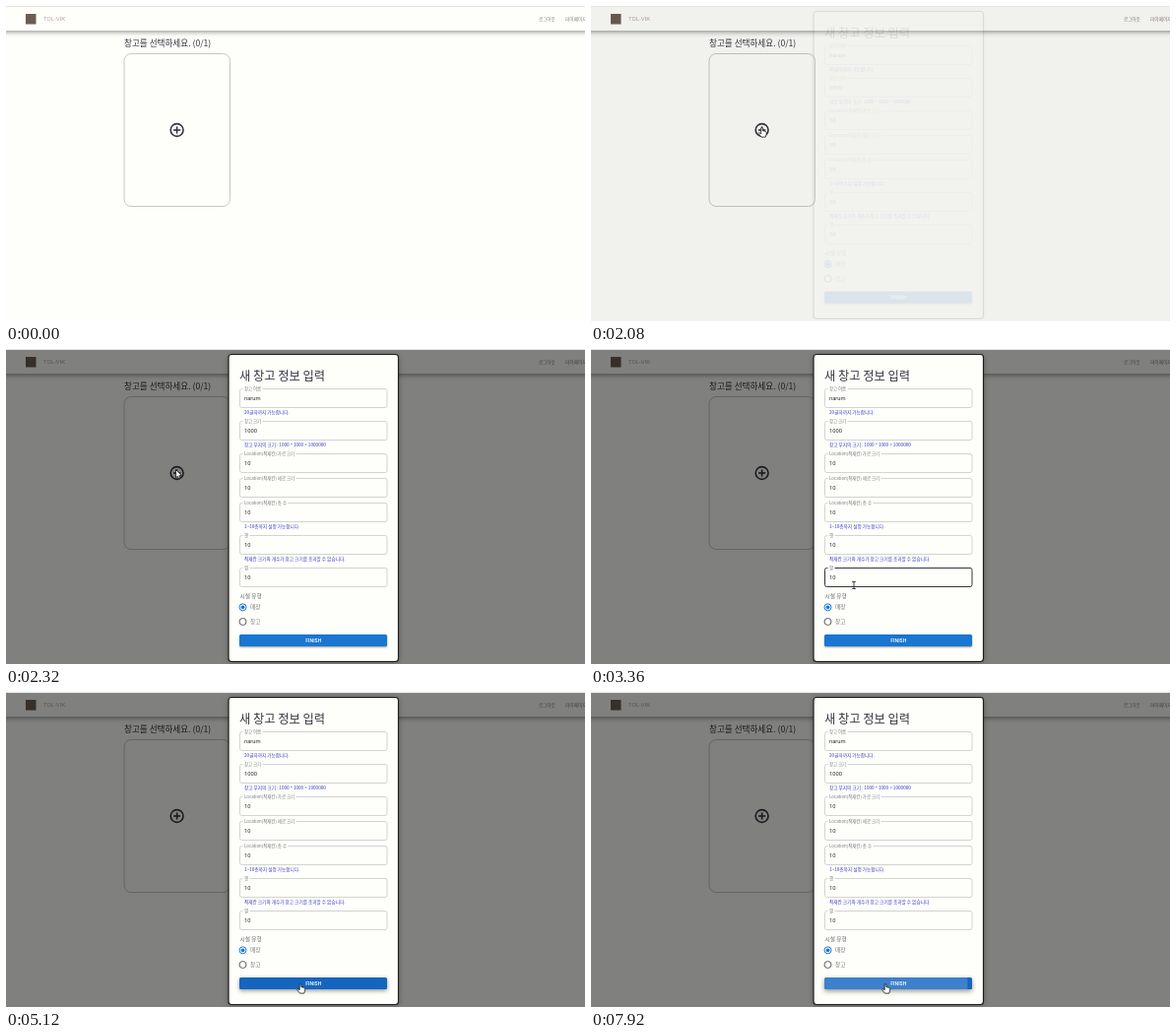
An HTML page with a canvas for the animation above (8000 ms loop, 588 by 320 pixels).

```html
<!DOCTYPE html>
<html lang="ko">
<head>
<meta charset="utf-8">
<style>
html, body { margin: 0; width: 100%; height: 100%; overflow: hidden; background: #fefefb; }
canvas { display: block; width: 588px; height: 320px; }
</style>
</head>
<body>
<canvas id="stage" width="588" height="320"></canvas>
<script>
const W = 588, H = 320, LOOP = 8000;
const PAPER = '#fefefb', BLUE = '#1976d2', INK = '#34343f';
const KR = '"Noto Sans CJK KR", "Noto Sans CJK JP", "Noto Sans", sans-serif';
const LATIN = 'Roboto, "Noto Sans CJK KR", sans-serif';

const main = document.getElementById('stage').getContext('2d');
const layer = document.createElement('canvas');
layer.width = W;
layer.height = H;
const modal = layer.getContext('2d');

// top, label, value, helper line
const fields = [
  [40.5, '창고 이름', 'narum', '20글자까지 가능합니다.'],
  [73.5, '창고 크기', '1000', '창고 부지의 크기 : 1000 * 1000 = 1000000'],
  [106.5, 'Location(적재칸) 가로 크기', '10'],
  [131.5, 'Location(적재칸) 세로 크기', '10'],
  [156.5, 'Location(적재칸) 층 수', '10', '1~10층까지 설정 가능합니다.'],
  [189.5, '행', '10', '적재칸 크기와 개수가 창고 크기를 초과할 수 없습니다.'],
  [222.5, '열', '10']
];

// pointer stops: step, x, y
const path = [
  [2, 190, 115], [3, 202, 88], [4, 215, 52], [5, 226, 20], [6, 231, 1],
  [7, 231, 1], [8, 225, 14], [9, 212, 46], [10, 196, 86], [11, 189, 105],
  [12, 180, 119], [14, 173.5, 123.5], [21, 173.5, 123.5], [22, 172.5, 122.5],
  [23, 172.5, 122.5], [26, 240, 162], [30, 263, 214], [34, 267, 240],
  [38, 287, 283], [40, 296, 294], [42, 299.5, 297], [43, 299, 296.5], [80, 299, 296.5]
];

const clamp = v => Math.max(0, Math.min(1, v));
const inside = (p, x, y, w, h) => p.x >= x && p.x <= x + w && p.y >= y && p.y <= y + h;

// cubic-bezier(.4, 0, .2, 1)
function ease(x) {
  x = clamp(x);
  let lo = 0, hi = 1;
  for (let i = 0; i < 24; i++) {
    const u = (lo + hi) / 2, v = 1 - u;
    if (1.2 * v * v * u + 0.6 * v * u * u + u * u * u < x) lo = u; else hi = u;
  }
  return lo * lo * (3 - 2 * lo);
}

function pointerAt(step) {
  if (step < path[0][0]) return null;
  let i = 1;
  while (i < path.length - 1 && path[i][0] < step) i++;
  const [n0, x0, y0] = path[i - 1], [n1, x1, y1] = path[i];
  const k = clamp((step - n0) / (n1 - n0));
  return { x: x0 + (x1 - x0) * k, y: y0 + (y1 - y0) * k };
}

function text(g, s, x, y, size, color, font = KR, weight = 400) {
  g.font = `${weight} ${size}px ${font}`;
  g.fillStyle = color;
  g.fillText(s, x, y);
}

function box(g, x, y, w, h, r, fill, stroke, line = 1) {
  g.beginPath();
  g.roundRect(x, y, w, h, r);
  if (fill) { g.fillStyle = fill; g.fill(); }
  if (stroke) { g.strokeStyle = stroke; g.lineWidth = line; g.stroke(); }
}

function circle(g, x, y, r, fill, stroke, line = 1) {
  g.beginPath();
  g.arc(x, y, r, 0, Math.PI * 2);
  if (fill) { g.fillStyle = fill; g.fill(); }
  if (stroke) { g.strokeStyle = stroke; g.lineWidth = line; g.stroke(); }
}

function shadow(g, color, blur, dy) {
  g.shadowColor = color;
  g.shadowBlur = blur;
  g.shadowOffsetY = dy;
}

function drawPage(g) {
  g.fillStyle = PAPER;
  g.fillRect(0, 0, W, H);

  g.save();
  shadow(g, 'rgba(0,0,0,.42)', 5, 1.5);
  g.fillStyle = PAPER;
  g.fillRect(-10, 0, W + 20, 25);
  g.restore();

  g.fillStyle = '#6b5d54';
  g.fillRect(20, 8, 10.5, 10.5);
  text(g, 'TOL-VIK', 38, 15.3, 6.2, '#94807a', LATIN, 300);
  text(g, '로그아웃', 541, 14.8, 4.5, '#8b807c');
  text(g, '마이페이지', 568, 14.8, 4.7, '#8b807c');

  text(g, '창고를 선택하세요. (0/1)', 120, 41.2, 8.6, INK);
  box(g, 120, 48.5, 107.5, 155, 7, null, '#c3cbc5');
  circle(g, 173.6, 126, 6.4, null, INK, 1.6);
  g.fillStyle = INK;
  g.fillRect(170, 125.2, 7.2, 1.6);
  g.fillRect(172.8, 122.4, 1.6, 7.2);
}

function drawField(g, [y, label, value, help], hot) {
  box(g, 237.5, y, 149.5, 19, 2, null, hot ? '#33363a' : '#cdd0cd', hot ? 1 : 0.9);
  g.font = `400 4.4px ${KR}`;
  g.fillStyle = PAPER;
  g.fillRect(240.5, y - 1, g.measureText(label).width + 3, 2);
  text(g, label, 242, y + 1.4, 4.4, '#777a7a');
  text(g, value, 242, y + 11.6, 5.8, '#2c2c30', LATIN);
  if (help) text(g, help, 242, y + 25.2, 4.65, '#3c3cc8');
}

function drawButton(g, step) {
  const hover = ease((step - 38.6) / 2.5);
  const press = clamp((step - 75.15) / 2.8);
  const mix = (a, b) => Math.round(a + (b - a) * hover);

  g.save();
  shadow(g, 'rgba(0,0,0,.42)', 2 + hover * 2 + press, 1 + hover * 0.5 + press * 0.5);
  box(g, 237, 290, 150, 12, 1.5, `rgb(${mix(25, 21)},${mix(118, 101)},${mix(210, 192)})`);
  g.restore();

  const grow = ease((step - 75.15) / 5.5);
  if (grow > 0) {
    g.save();
    g.beginPath();
    g.roundRect(237, 290, 150, 12, 1.5);
    g.clip();
    circle(g, 299, 297, 89 * grow, `rgba(255,255,255,${0.1 + 0.08 * grow})`);
    g.restore();
  }
  g.textAlign = 'center';
  text(g, 'FINISH', 312.3, 298, 5.1, '#fff', LATIN, 500);
  g.textAlign = 'left';
}

function drawModal(g, step, p) {
  g.clearRect(0, 0, W, H);
  g.save();
  shadow(g, 'rgba(0,0,0,.3)', 6, 1);
  box(g, 226, 5.5, 172.5, 312, 3, PAPER);
  g.restore();
  box(g, 226, 5.5, 172.5, 312, 3, null, '#1c1d1c', 1.2);
  text(g, '새 창고 정보 입력', 237, 31.8, 12.25, INK);

  for (const f of fields) drawField(g, f, inside(p, 237, f[0], 150, 19));

  text(g, '시설 유형', 237.5, 252.6, 5.7, '#66686a');
  circle(g, 240.5, 262.3, 3.5, null, BLUE, 1);
  circle(g, 240.5, 262.3, 1.9, BLUE);
  text(g, '매장', 248, 264.3, 5.7, '#77797b');
  circle(g, 240.5, 277, 3.5, null, '#5e6062', 1);
  text(g, '창고', 248, 279, 5.7, '#77797b');
  drawButton(g, step);
}

function outline(g, points) {
  g.beginPath();
  points.forEach(([x, y]) => g.lineTo(x, y));
  g.closePath();
  g.fill();
  g.stroke();
}

function drawPointer(g, p, kind) {
  g.save();
  g.translate(p.x, p.y);
  g.fillStyle = '#fff';
  g.strokeStyle = '#161616';
  g.lineWidth = 0.8;
  g.lineJoin = 'round';
  if (kind === 'beam') {
    g.beginPath();
    g.moveTo(-1.8, -3.5); g.lineTo(1.8, -3.5);
    g.moveTo(0, -3.5); g.lineTo(0, 3.5);
    g.moveTo(-1.8, 3.5); g.lineTo(1.8, 3.5);
    g.stroke();
  } else if (kind === 'hand') {
    outline(g, [[-0.8, 0.4], [0, 0], [0.8, 0.4], [0.9, 3.2], [3.9, 3.8], [4.7, 4.6],
      [4.6, 7.2], [3.7, 9.6], [-0.6, 9.6], [-3.5, 5.9], [-2.8, 5.1], [-0.8, 6.3]]);
  } else {
    outline(g, [[0, 0], [0, 8.4], [1.9, 6.7], [3.2, 9.5], [4.5, 8.9], [3.3, 6.2], [5.9, 6]]);
  }
  g.restore();
}

function pointerKind(p, open) {
  if (!open) return inside(p, 120, 48, 108, 156) ? 'hand' : 'arrow';
  if (fields.some(f => inside(p, 237, f[0], 150, 19))) return 'beam';
  return inside(p, 237, 290, 150, 12) ? 'hand' : 'arrow';
}

// Four picture steps per 400 ms; the third is held twice as long.
function stepAt(ms) {
  const k = Math.floor(ms / 80);
  return 4 * Math.floor(k / 5) + [0, 1, 2, 2, 3][k % 5];
}

function draw(step) {
  const g = main;
  const p = pointerAt(step);
  const fade = ease((step - 20.6) / 2.25);

  drawPage(g);
  if (fade > 0) {
    g.fillStyle = `rgba(0,0,0,${0.5 * fade})`;
    g.fillRect(0, 0, W, H);
    drawModal(modal, step, p);
    g.globalAlpha = fade;
    g.drawImage(layer, 0, 0);
    g.globalAlpha = 1;
  }
  if (p) drawPointer(g, p, pointerKind(p, step > 21));
  g.fillStyle = '#e4e5e2';
  g.fillRect(0, 0, W, 1);
}

const start = performance.now();
function tick() {
  draw(stepAt((performance.now() - start) % LOOP));
  requestAnimationFrame(tick);
}
tick();
</script>
</body>
</html>
```
